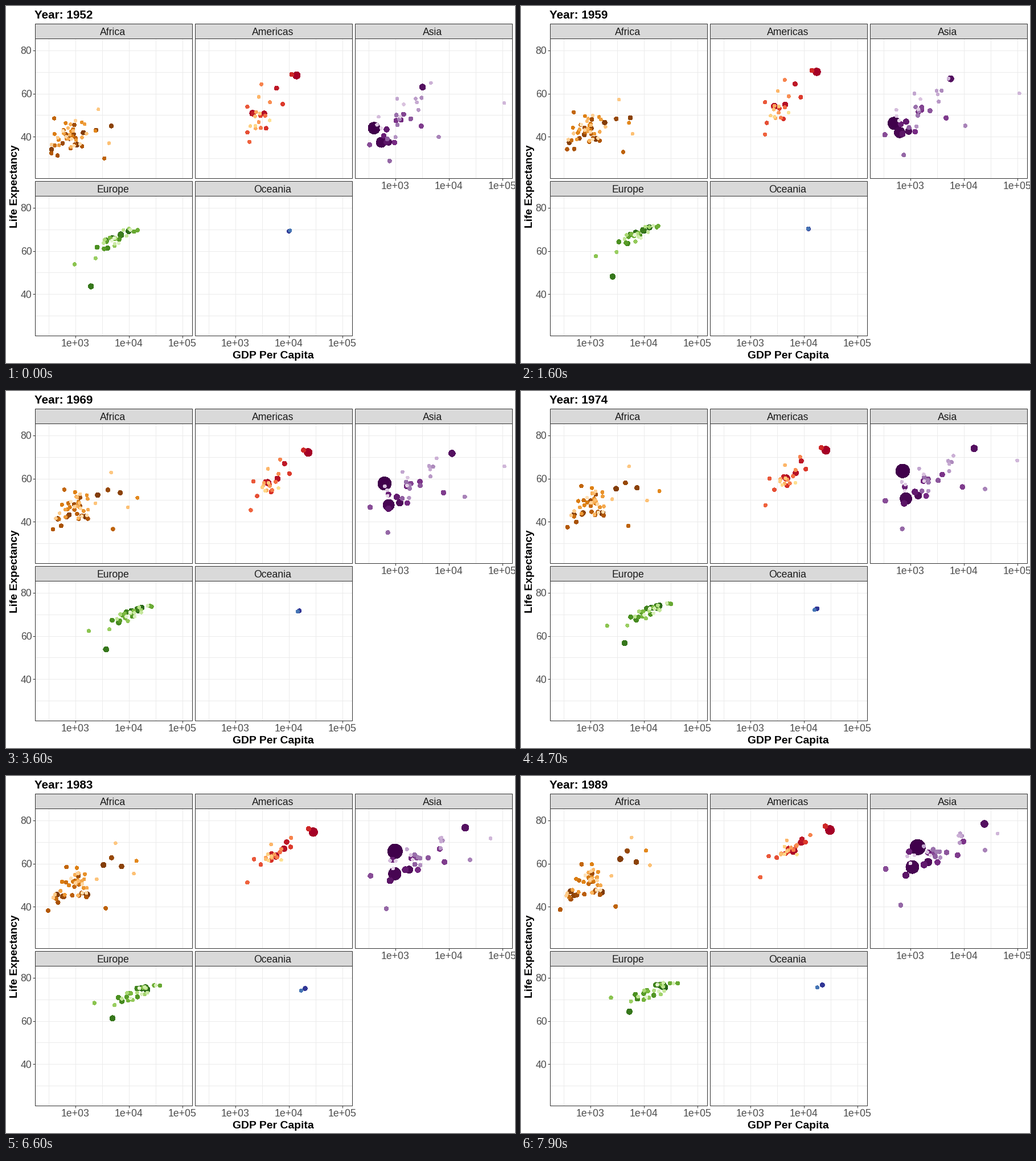
Write a matplotlib script that moves like this. It is 894x626 px and loops after 8 s.

```python
import matplotlib.pyplot as plt
import numpy as np
from matplotlib.animation import FuncAnimation
from matplotlib.colors import LinearSegmentedColormap
from matplotlib.patches import Rectangle

W, H, DPI = 894, 626, 100
PT = 72 / DPI
FRAMES, INTERVAL = 80, 100
FIRST, LAST = 1952, 1992
YEARS_PER_FRAME = 55 / 119
COL_STEP, ROW_STEP = 281.2, 276

# Leading dots: population in millions, then (income, life expectancy)
# waypoints spread evenly between FIRST and LAST.
AFRICA = [
    (53.7, 1077, 36.3, 1620, 47.5),
    (34.8, 1419, 41.9, 3795, 63.7),
    (30.8, 362, 34.1, 421, 48.1),
    (23.9, 4725, 45, 7225, 61.9),
    (23, 781, 39.1, 458, 45.5),
    (14.8, 2449, 43.1, 5023, 67.7),
    (9.8, 469, 31.3, 411, 44.3),
    (5.9, 3521, 30, 5474, 37.9, 2628, 40.6),
    (5.8, 407, 48.5, 693, 60.4),
    (2.2, 2388, 42.7, 21011, 52.8, 9640, 68.8),
    (.54, 4293, 37, 11402, 48.7, 13522, 61.4),
    (.46, 2719, 52.7, 6101, 73.6),
]
AMERICAS = [
    (210, 13990, 68.4, 32004, 76.1),
    (101, 2109, 50.9, 6950, 67.1),
    (56, 3478, 50.8, 9472, 71.5),
    (24.8, 5911, 62.5, 9308, 71.9),
    (22.5, 2144, 50.6, 5445, 68.4),
    (22.3, 11367, 68.8, 26343, 78),
    (14, 3759, 43.9, 4446, 66.5),
    (11.5, 7690, 55.1, 10734, 71.2),
    (4.6, 1840, 37.6, 1456, 55.1),
    (2.7, 3082, 64.3, 14642, 73.9),
]
ASIA = [
    (862, 400, 44, 540, 47, 677, 63.1, 962, 65.5, 1656, 68.7),
    (567, 547, 37.4, 1164, 60.2),
    (121, 750, 37.5, 2383, 62.7),
    (107, 3217, 63, 14779, 73.4, 26825, 79.4),
    (71, 684, 37.5, 838, 56),
    (69, 685, 43.4, 1972, 60.8),
    (44.6, 605, 40.4, 989, 67.7),
    (40.8, 1273, 47.8, 2279, 66.5),
    (33.5, 1031, 47.5, 12104, 72.2),
    (30.6, 3035, 44.9, 9614, 55.2, 7236, 65.7),
    (28.5, 331, 36.3, 347, 59.3),
    (13, 779, 28.8, 649, 41.7),
    (6.5, 6460, 39.9, 24837, 53.9, 24842, 68.8),
    (.84, 108382, 55.6, 109348, 67.7, 34933, 75.2),
]
EUROPE = [
    (78.7, 7144, 67.5, 26505, 76.1),
    (56, 9980, 69.2, 22705, 76.4),
    (54.4, 4931, 65.9, 22014, 77.4),
    (52, 1969, 43.6, 5678, 66.1),
    (51.7, 7030, 67.4, 24704, 77.5),
    (34.5, 3834, 64.9, 18603, 77.6),
    (33, 4029, 61.3, 7739, 71),
    (6.4, 14734, 69.6, 31872, 78),
    (3.8, 974, 53.8, 2547, 72.2),
]
OCEANIA = [
    (13, 10040, 69.1, 23425, 77.6),
    (2.9, 10557, 69.4, 18363, 76.3),
]

rng = np.random.default_rng(7)


def crowd(n, pop, gdp, spread, life, slope, noise, rise, gain, pull):
    """Smaller countries scattered around a trend that climbs over time."""
    rows = []
    for p in np.geomspace(pop, .2, n):
        a, b, c = np.clip(rng.normal(size=3), -1.8, 1.8)
        off = slope * spread * a + noise * b
        g = gdp + spread * a
        g2 = g + rise + .6 * spread * c
        l2 = life + gain + (1 - pull) * off + 3 * c
        rows.append((p, 10 ** g, life + off, 10 ** g2, l2))
    return rows


AFRICA += crowd(40, 15, 2.97, .23, 40, 6, 4, .1, 12, 0)
AMERICAS += crowd(15, 9, 3.46, .13, 53, 18, 6, .25, 16, .5)
ASIA += crowd(19, 39, 3.16, .28, 50, 12, 6, .45, 18, .4)
EUROPE += crowd(21, 20, 3.74, .2, 66, 16, 2, .46, 8.5, .7)

# title, column, row, yearly growth, mid-way bulge (log income, life),
# colours from most to least populous, dots
PANELS = [
    ("Africa", 0, 0, .025, (.11, 1.7),
     "#7F3B08 #B35806 #E08214 #FDB863 #FEE0B6", AFRICA),
    ("Americas", 1, 0, .018, (.08, .6),
     "#A50026 #D73027 #F46D43 #FDAE61 #FEE090", AMERICAS),
    ("Asia", 2, 0, .018, (0, 1),
     "#40004B #762A83 #9970AB #C2A5CF #E7D4E8", ASIA),
    ("Europe", 0, 1, .006, (.11, 1),
     "#276419 #4D9221 #7FBC41 #B8E186 #E6F5D0", EUROPE),
    ("Oceania", 1, 1, .017, (.05, -1.2), "#313695 #4575B4", OCEANIA),
]


def x_px(log_gdp, col):
    return 121.5 + 94 * (log_gdp - 3) + COL_STEP * col


def y_px(life, row):
    return 153.5 - 3.787 * (life - 60) + ROW_STEP * row


plt.rcParams["font.family"] = "Liberation Sans"
fig = plt.figure(figsize=(W / DPI, H / DPI), dpi=DPI, facecolor="white")
ax = fig.add_axes([0, 0, 1, 1])
ax.set_xlim(0, W)
ax.set_ylim(H, 0)
ax.axis("off")


def label(x, y, s, px, color, ha="center", **kw):
    return ax.text(x, y, s, fontsize=px * PT, color=color, ha=ha,
                   va="baseline", **kw)


def line(xs, ys, color, z):
    ax.plot(xs, ys, color=color, lw=PT, zorder=z, solid_capstyle="butt")


def box(x, y, w, h, fill):
    ax.add_patch(Rectangle((x, y), w, h, facecolor=fill, edgecolor="#333333",
                           lw=PT, zorder=4))


def draw_panel(title, col, row):
    left = round(COL_STEP * col) + 50.5
    top = ROW_STEP * row + 56.5
    right, bottom = left + 276, top + 245
    for v in np.arange(2.5, 5.1, .5):
        line([x_px(v, col)] * 2, [top, bottom], "#EBEBEB", 1)
    for v in range(30, 81, 10):
        line([left, right], [y_px(v, row)] * 2, "#EBEBEB", 1)
    box(left, top, 276, 245, "none")
    box(left, top - 26, 276, 26, "#D9D9D9")
    label(left + 137, top - 5.5, title, 17.6, "#1A1A1A", zorder=5)
    if row == 1 or col == 2:
        for p in (3, 4, 5):
            x = x_px(p, col)
            line([x, x], [bottom, bottom + 4], "#333333", 4)
            label(x, bottom + 19.5, f"1e+0{p}", 17.6, "#4D4D4D")
    if col == 0:
        for v in (40, 60, 80):
            y = y_px(v, row)
            line([left - 4, left], [y, y], "#333333", 4)
            label(45.5, y + 6.5, str(v), 17.6, "#4D4D4D", "right")


def path(pts, bulge):
    """Positions as functions of the year; two-point paths get the bulge."""
    gdp, life = np.log10(pts[::2]), np.array(pts[1::2])
    if len(life) == 2:
        gdp = np.insert(gdp, 1, gdp.mean() + bulge[0])
        life = np.insert(life, 1, life.mean() + bulge[1])
    return np.linspace(FIRST, LAST, len(life)), gdp, life


paths, pops, rates, colors, cells = [], [], [], [], []
for title, col, row, rate, bulge, ramp, rows in PANELS:
    draw_panel(title, col, row)
    cmap = LinearSegmentedColormap.from_list(title, ramp.split())
    ranked = sorted(rows, reverse=True)
    for k, (pop, *pts) in enumerate(ranked):
        paths.append(path(pts, bulge))
        pops.append(pop)
        rates.append(rate)
        colors.append(cmap(k / (len(ranked) - 1)))
        cells.append((col, row))
pops, rates = np.array(pops), np.array(rates)

label(469, 617.5, "GDP Per Capita", 19.4, "black", weight="bold")
label(20.5, 316.5, "Life Expectancy", 19.2, "black", weight="bold",
      rotation=90, rotation_mode="anchor")
year_text = label(50, 21.5, "", 20.6, "black", "left", weight="bold")
dots = ax.scatter(np.zeros(len(pops)), np.zeros(len(pops)), c=colors,
                  linewidths=0, antialiased=False, zorder=3)


def update(i):
    year = FIRST + i * YEARS_PER_FRAME
    dots.set_offsets([
        (x_px(np.interp(year, t, gdp), col), y_px(np.interp(year, t, life), row))
        for (t, gdp, life), (col, row) in zip(paths, cells)])
    share = pops * np.exp(rates * (year - 1972)) / 1319
    dots.set_sizes(((5 + 23.5 * np.sqrt(share)) * PT) ** 2)
    year_text.set_text(f"Year: {round(year)}")
    return dots, year_text


anim = FuncAnimation(fig, update, frames=FRAMES, interval=INTERVAL,
                     init_func=lambda: update(0), repeat=True, repeat_delay=0)
plt.show()
```
